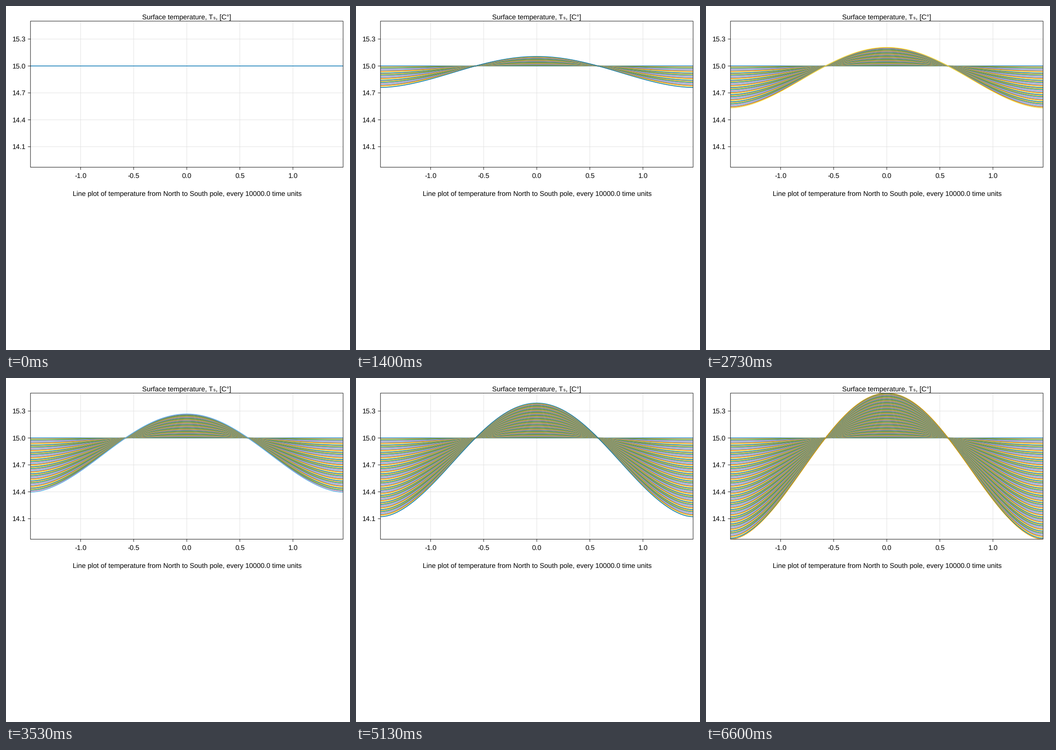
Recreate the animation shown at these times as a matplotlib script. Size 748 px wide and 748 px high, loop 6.67 s.

```python
import matplotlib.pyplot as plt
import numpy as np
from matplotlib.animation import FuncAnimation
from matplotlib.collections import LineCollection
from matplotlib.patches import Rectangle

plt.rcParams["font.family"] = "Liberation Sans"
plt.rcParams["text.hinting"] = "none"

SIZE, DPI = 748, 64
FRAMES, TICK_MS = 230, 29    # 6670 ms per loop
CURVES, CURVE_MS = 100, 200 / 3
UNIT = 0.935                 # pixels per layout unit
FONT = 16 * UNIT
PALETTE = ["#0072B2", "#E69F00", "#009E73", "#CC79A7",
           "#56B4E9", "#D55E00", "#F0E442"]

LAT_MAX = np.pi / 2 * 15 / 16
T0, T_MAX, T_MIN = 15.0, 15.5, 13.871
LEFT, RIGHT, TOP, BOTTOM = 53.2, 733.0, 32.9, 350.6


def pt(px):
    return px * 72 / DPI


def to_x(lat):
    return LEFT + (lat + LAT_MAX) / (2 * LAT_MAX) * (RIGHT - LEFT)


def to_y(temp):
    return TOP + (T_MAX - temp) / (T_MAX - T_MIN) * (BOTTOM - TOP)


fig = plt.figure(figsize=(SIZE / DPI, SIZE / DPI), dpi=DPI, facecolor="white")
ax = fig.add_axes([0, 0, 1, 1])
ax.set(xlim=(0, SIZE), ylim=(SIZE, 0))
ax.axis("off")


def rule(xs, ys, color, z):
    ax.plot(xs, ys, color=color, lw=pt(UNIT), zorder=z, snap=False,
            solid_capstyle="butt")


def label(x, y, text, ha="center", size=FONT):
    ax.text(x, y, text, ha=ha, va="baseline", fontsize=pt(size), color="black")


# Grid, ticks and tick labels
GRID, TICK = "#e0e0e0", 6 * UNIT
for lat in np.arange(-1, 1.01, 0.5):
    x = to_x(lat)
    rule([x, x], [TOP, BOTTOM], GRID, 1)
    rule([x, x], [BOTTOM, BOTTOM + TICK], "black", 4)
    label(x, 373.5, f"{lat:.1f}")
for temp in np.arange(14.1, 15.31, 0.3):
    y = to_y(temp)
    rule([LEFT, RIGHT], [y, y], GRID, 1)
    rule([LEFT - TICK, LEFT], [y, y], "black", 4)
    label(43.5, y + 5.4, f"{temp:.1f}", "right")

# Frame and captions
ax.add_patch(Rectangle((LEFT, TOP), RIGHT - LEFT, BOTTOM - TOP, fill=False,
                       ec="black", lw=pt(UNIT), zorder=4, snap=False))
label(296.2, 29, "Surface temperature, T", "left")
label(451, 29, "s", "left", 9.5)
label(489.7, 29, ", [C°]", "right")
label(393.6, 412.4, "Line plot of temperature from North to South pole, "
                    "every 10000.0 time units")


def cooling(lat, width=0.1):
    """sin² of latitude, levelled off to zero slope at both ends."""
    slope = np.sin(2 * LAT_MAX)
    return (np.sin(lat) ** 2
            - slope * width * np.exp((np.abs(lat) - LAT_MAX) / width))


# Temperature profiles: warming equator, cooling poles, linear in time
lat = np.linspace(-LAT_MAX, LAT_MAX, 97)
drop = cooling(lat)
drop = (drop - drop.min()) / (drop.max() - drop.min())
profile = (T_MAX - T0) - (T_MAX - T_MIN) * drop
curves = [np.column_stack([to_x(lat), to_y(T0 + profile * k / (CURVES - 1))])
          for k in range(CURVES)]
colors = [PALETTE[k % len(PALETTE)] for k in range(CURVES)]

lines = LineCollection([], linewidths=pt(1.5), zorder=3, snap=False)
ax.add_collection(lines, autolim=False)
lines.set_clip_path(Rectangle((LEFT, TOP), RIGHT - LEFT, BOTTOM - TOP,
                              transform=ax.transData))


def update(i):
    # A curve is shown from the tick in which its (10 ms rounded) start falls
    end = (i + 1) * TICK_MS - 1
    k = min(int((end + 4) / CURVE_MS), CURVES - 1)
    lines.set_segments(curves[:k + 1])
    lines.set_color(colors[:k + 1])
    return [lines]


anim = FuncAnimation(fig, update, frames=FRAMES, interval=TICK_MS,
                     repeat=True, repeat_delay=0, blit=False)
plt.show()
```
